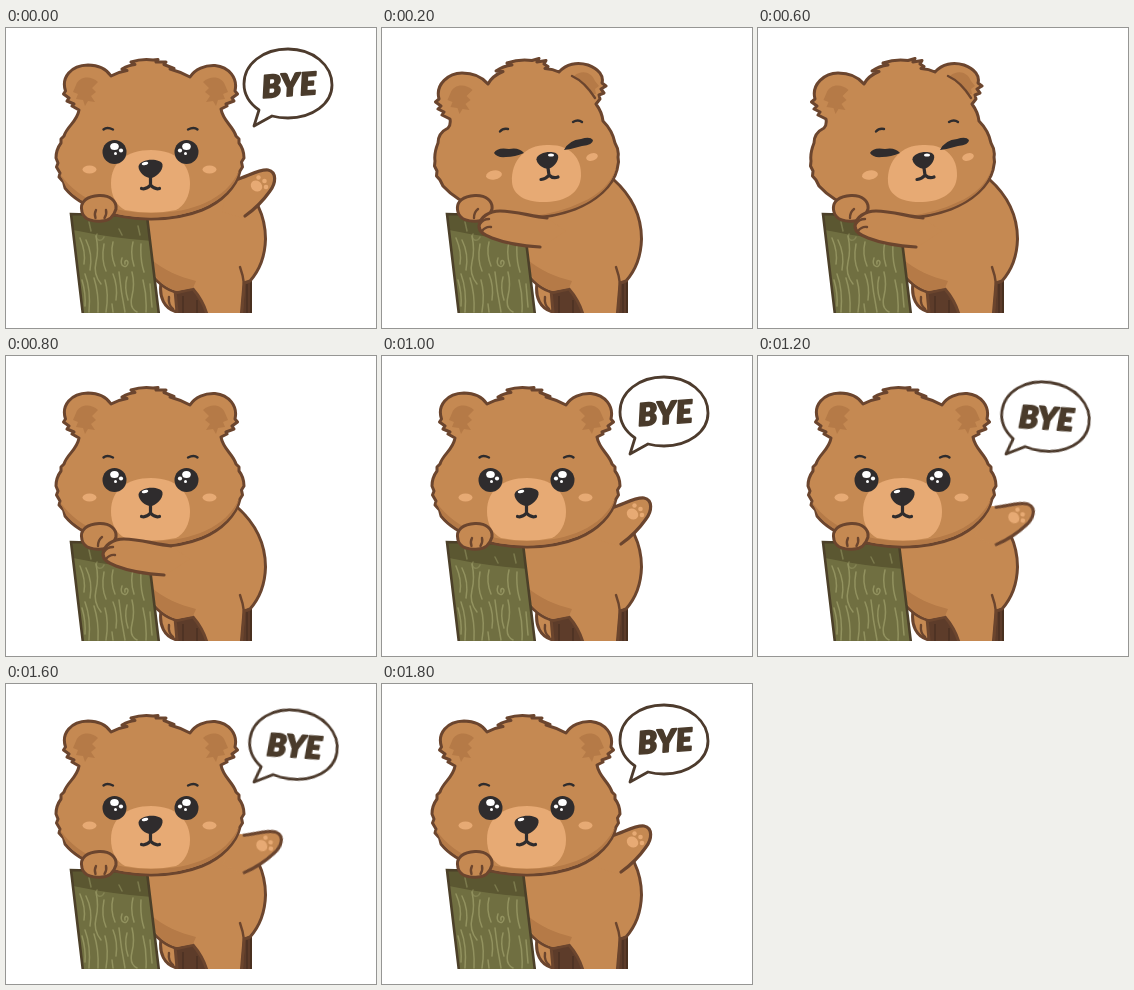
Recreate the animation shown at these times as an HTML page. Size 370x300 px, loop 2 s.

```html
<!DOCTYPE html>
<html lang="en">
<head>
<meta charset="utf-8">
<title>Waving bear</title>
<style>
  html, body { margin: 0; width: 100%; height: 100%; overflow: hidden; background: #fff; }
  svg { display: block; width: 370px; height: 300px; }

  .fur { fill: #c58952; }
  .shade { fill: #b57a47; }
  .light { fill: #e7aa74; }
  .dark { fill: #2f2c2d; }
  .white { fill: #fff; }
  .ink { stroke: #6b452e; stroke-width: 3; stroke-linejoin: round; stroke-linecap: round; }
  .line { fill: none; stroke: #6b452e; stroke-width: 2.4; stroke-linecap: round; }
  .bold { stroke-width: 3.2; }
  .face { fill: none; stroke: #2f2c2d; stroke-width: 3.2; stroke-linecap: round; stroke-linejoin: round; }
  .brow { stroke-width: 2.4; }
  .grain { fill: none; stroke: #92925f; stroke-width: 1.5; stroke-linecap: round; }
  .word {
    font: italic 900 31px Lato, "Open Sans", sans-serif;
    fill: #4a3b2b; stroke: #4a3b2b; stroke-width: 1.6; stroke-linejoin: round;
    text-anchor: middle;
  }

  /* Every pose holds, then cuts hard to the next one. */
  .awake, .asleep, .lean, .bye, .breathe, .wave, .wag {
    animation: 2s step-end infinite;
  }
  .awake { animation-name: awake; }
  .asleep { animation-name: asleep; }
  .lean { animation-name: lean; }
  .bye { animation-name: bye; }
  .breathe { animation-name: breathe; }
  .wave { animation-name: wave; transform-origin: 236px 185px; }
  .wag { animation-name: wag; transform-origin: 248px 98px; }

  @keyframes awake { 0%, 40%, 100% { visibility: visible; } 10% { visibility: hidden; } }
  @keyframes asleep { 0%, 40%, 100% { visibility: hidden; } 10% { visibility: visible; } }
  @keyframes lean { 0%, 50%, 100% { visibility: hidden; } 10% { visibility: visible; } }
  @keyframes bye { 0%, 50%, 100% { visibility: visible; } 10% { visibility: hidden; } }
  @keyframes breathe { 0%, 30%, 100% { transform: none; } 20% { transform: translateY(1px); } }
  @keyframes wave { 0%, 50%, 70%, 90%, 100% { transform: none; } 60%, 80% { transform: rotate(12deg); } }
  @keyframes wag { 0%, 50%, 70%, 90%, 100% { transform: none; } 60%, 80% { transform: rotate(8deg); } }
</style>
</head>
<body>
<svg viewBox="0 0 370 300">
  <defs>
    <clipPath id="stage"><path d="M0 0H370V285H0Z"/></clipPath>
    <clipPath id="log"><path d="M65 186L141 188L153 285H77Z"/></clipPath>
    <g id="eye">
      <circle class="dark" r="12"/>
      <ellipse class="white" cx="0" cy="-5.500" rx="4.300" ry="3.500"/>
      <circle class="white" cx="6.500" cy="-1.500" r="2.100"/>
      <circle class="white" cx="1" cy="1.500" r="1.500"/>
    </g>
    <path id="nose" class="dark" d="M-12 -2C-11 -10 10 -11 12 -4C13 2 5 9.500 0 9.500C-5 9.500 -12 4 -12 -2Z"/>
  </defs>

  <g clip-path="url(#stage)">
    <!-- back stump -->
    <path d="M170 264L245 252V287H170Z" fill="#5d3c2a" stroke="#49301f" stroke-width="2"/>
    <path d="M177 268V285M191 272V285M241 256V285" fill="none" stroke="#4b3023" stroke-width="1.500"/>

    <!-- body and legs -->
    <path class="fur ink" d="M155 255C153 269 158 281 171 284L169 262Z"/>
    <path class="line" d="M163 269Q162 277 167 281"/>
    <path class="fur ink" d="M120 170L180 150L231 151C249 167 259.500 188 259.500 211C259 231 252 244 244 253L238 255C237 268 236 279 235 290H202C199 278 194 269 187 261L171 264.500C160 262 150 254 140 240Z"/>
    <path class="shade" d="M145 231C157 242 174 249 190 253L187 260L171 263C159 260 150 252 145 240Z"/>
    <path class="line" d="M234 239Q237 247 238 256Q237 270 236 285"/>

    <!-- waving arm -->
    <g class="bye"><g class="wave">
      <path class="fur" d="M222 152L234 150C244 147 254 141 262 142C271 144 270 155 264 163L251 179L236 190L216 184Z"/>
      <path class="line bold" d="M231 151.500C244 147 254 141 262 142C271 144 270 155 264 163C257 173 249 181 239 188"/>
      <ellipse class="light" cx="250.500" cy="158" rx="6" ry="5.200" transform="rotate(35 250.500 158)"/>
      <circle class="light" cx="252.500" cy="149.500" r="2.200"/>
      <circle class="light" cx="258.500" cy="153" r="2.300"/>
      <circle class="light" cx="260" cy="159" r="2.300"/>
    </g></g>

    <!-- front stump -->
    <path d="M65 186L141 188L153 287H77Z" fill="#706f41"/>
    <g clip-path="url(#log)">
      <path d="M64 184H143L146 213Q105 210 67 202Z" fill="#5b5731"/>
      <g class="grain">
        <path d="M74 210Q80 224 78 236M80 212Q87 226 84 242M79 246Q85 262 83 284"/>
        <path d="M90 208Q93 222 90 234T95 256M88 250Q93 266 92 284M98 216Q95 232 100 243M99 252Q103 266 100 284"/>
        <path d="M107 214Q104 226 109 238M107 246Q112 258 110 272M113 244Q115 264 119 284M106 276L107 284"/>
        <path d="M127 214Q124 226 128 238M126 244Q129 256 126 268T131 284M135 216Q134 232 138 244M137 252Q141 268 140 284"/>
        <path d="M121 249Q118 260 122 272M144 256L146 279M76 252Q80 266 79 278"/>
        <path d="M116 230C113 239 121 241 122 235C122 231 118 232 119 236"/>
        <path opacity=".6" d="M91 206C88 212 96 215 98 209M83 194L85 203M113 201L116 207M132 198L134 207"/>
      </g>
    </g>
    <path d="M77 287L65 186L141 188L153 287" fill="none" stroke="#4c4029" stroke-width="2.600"/>

    <!-- head, awake -->
    <g class="awake">
      <path class="fur ink" d="M73 82L66 78L68 76L61 73L63 70L57.500 66L59.500 63C55 49 65 37.500 82 37C93 37 101 42 105 48Q112 44 121 42.500L116 41Q123 37 129 36.500L125 34Q136 30.500 147 32L152 31.500L150 34L160 34L158 36.500L168 40.500L164 41Q175 44 184 49C189 41 199 37 209 37.500C223 39 232 50 229 63L231.500 66L226 70L228 73L220 76L221 78L215 81C217 93 227 98 230 108L233 111L233 115C237 120 238 125 238 130L235.500 134L236.500 139L234 143C231 158 216 174 196 182C181 188 163 191 145 191C109 191 74 179 59 160L57.500 154L53 149L54 145L50.500 139L52 135L50 130C50 124 52 119 55 115L55 111L58 108C61 98 71 94 73 82Z"/>
      <path class="shade" d="M54 146C74 174 108 185 146 185C187 185 220 171 233 143C230 158 215 173 194 181C178 187 162 189.500 145 189.500C109 189.500 75 178 60 159Z"/>
      <g class="shade">
        <path id="tuft" d="M70 57C73 48 85 47 92 54L86 60L90 64L85 68L89 74L82 73L79 78L77 72L70 71L72 66L67 64Z"/>
        <use href="#tuft" transform="matrix(-1 0 0 1 289 0)"/>
      </g>
      <path class="light" d="M105 155C105 134 121 122 145 122C170 122 184 136 184 156C184 168 178 178 170 182Q145 187 119 182C110 177 105 168 105 155Z"/>
      <ellipse class="light" cx="83.500" cy="141.500" rx="7" ry="4"/>
      <ellipse class="light" cx="203.500" cy="141.500" rx="7" ry="4"/>
      <path class="face brow" d="M97.500 101.500Q101 98.500 107 101.500M182 101.500Q188 98.500 191.500 101.500"/>
      <use href="#eye" x="108.500" y="124"/>
      <use href="#eye" transform="translate(180.500 124) scale(-1 1)"/>
      <use href="#nose" x="144.500" y="140.500"/>
      <ellipse class="white" cx="139" cy="135.500" rx="3.300" ry="1.600" transform="rotate(-15 139 135.500)"/>
      <path class="face" d="M144.500 149V157M135.500 160.500Q140 162 144.500 157Q149 162 153.500 160.500"/>
    </g>

    <!-- head, asleep -->
    <g class="asleep"><g class="breathe">
      <path class="fur ink" d="M68 91L60 87L62 84L56 81L59 78L53.500 74L57 71C53 56 67 45 80 45C92 45 101 50 106 56Q110 48 121 43.500L114 43Q121 38 130 37L125 35Q138 30.500 150 32.500L157 30.500L155 34L164 32.500L162 36L166 38.500L163 40.500Q171 41 177 44C184 36 195 33.500 206 37C217 41 222 48 220 55L224 58L219 61L222 65L217 67L218 71L214 76Q220 84 221 93C226 98 231 105 233 115C236 120 237 124 236 129L236.500 134L235 142C231 158 214 173 193 181C177 187 161 190 144 190C114 190 79 178 61 158L58 152L54.500 148L55 143L52.500 138L53 133C52 126 54 120 56 115C56 108 60 103 66 100Q69 97 68 91Z"/>
      <path class="shade" d="M200 174C217 167 229 155 234 140C230 158 214 172 193 180C180 185 164 188 151 188Q180 184 200 174Z"/>
      <use href="#tuft" class="shade" transform="translate(-1.500 8)"/>
      <path class="shade" d="M192 48C199 42 209 43 213 53L217 58L213 61L214 66L209 66L206 63L199 54Z"/>
      <path class="line" d="M190 48Q203 54 213 70"/>
      <path class="light" d="M130 154C129 133 143 117 165 117C188 116 200 130 199 148C198 165 184 173 165 174C145 175 131 168 130 154Z"/>
      <ellipse class="light" cx="112" cy="147" rx="8" ry="4.600" transform="rotate(-9 112 147)"/>
      <ellipse class="light" cx="210" cy="129" rx="6" ry="3.700" transform="rotate(-18 210 129)"/>
      <path class="face brow" d="M118 103.500Q121 100 126 101M191 94Q196 91 200 94"/>
      <path class="dark" d="M112 125Q115 119 127 121Q137 119 142 125Q133 129 124 129Q115 130 112 125ZM182 122Q187 112 199 111Q208 108 211 112Q211 117 200 118Q190 121 182 122Z"/>
      <use href="#nose" transform="translate(165.500 132) rotate(-5) scale(.91)"/>
      <ellipse class="white" cx="169" cy="127" rx="3" ry="1.600"/>
      <path class="face" d="M166 140L167 147M159 151.500Q164 151 167 147Q171 151 176 149"/>
    </g></g>

    <!-- resting paw -->
    <path class="fur ink" d="M76 184C73 173 82 168 93 167.500C104 167 111 173 110 181C108 188 103 193 96 193C88 194 78 192 76 184Z"/>
    <path class="line bye" d="M89.500 190Q88 186 90 182M98.500 190Q101 186 100 182"/>

    <!-- leaning arm -->
    <g class="lean"><g class="breathe">
      <path class="line" d="M92 190Q92 184 96 181"/>
      <path class="fur" d="M97 198C98 189 107 183 118 183C133 183 148 188 165 190L184 203L159 219C140 218 123 215 110 210C102 207 97 204 97 198Z"/>
      <path class="line bold" d="M165 190C148 188 133 183 118 183C107 183 98 189 97 198C97 204 102 207 110 210C123 215 140 218 158 219"/>
      <path class="line" d="M98 196Q101 191 107 191M100 203Q104 198 109 199"/>
    </g></g>
  </g>

  <!-- speech bubble -->
  <g class="bye"><g class="wag">
    <path d="M253 82C243 75 238 66 238 56C238 36 257 21 282 21C307 21 326 37 326 57C326 76 306 90 282 90Q273 90 266 88L248 98Z" fill="#fff" stroke="#4d3b2d" stroke-width="2.800" stroke-linejoin="round"/>
    <text class="word" x="283" y="68" transform="rotate(-4 283 57)">BYE</text>
  </g></g>
</svg>
</body>
</html>
```
